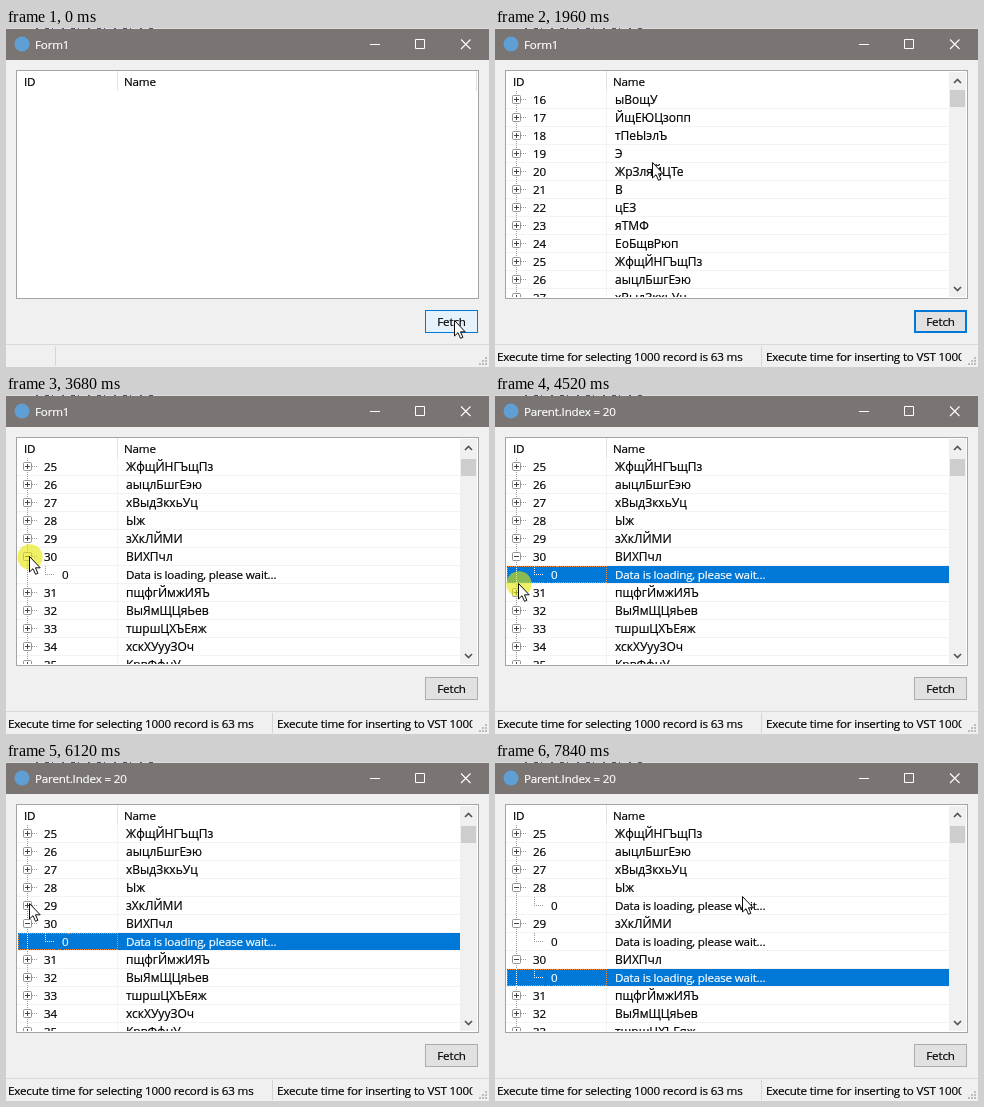
An HTML page for the animation above (8 s loop, 483 by 339 pixels).

```html
<!DOCTYPE html>
<html lang="en">
<head>
<meta charset="utf-8">
<title>Form1</title>
<style>
  html, body { margin: 0; width: 100%; height: 100%; overflow: hidden; background: #f0f0f0; }
  svg { display: block; width: 483px; height: 339px; }
  text {
    font: 11.6px "Open Sans", "Noto Sans", sans-serif; letter-spacing: -.165px; white-space: pre;
    color: #000; fill: currentColor; stroke: currentColor; stroke-width: .2px;
  }
  .name { font-size: 12px; letter-spacing: 0; }
  .crisp { shape-rendering: crispEdges; }
  .dots { stroke: #9a9a9a; stroke-dasharray: 1 1; fill: none; }
</style>
</head>
<body>
<svg viewBox="0 0 483 339">
  <defs>
    <clipPath id="listClip"><rect x="11" y="63" width="443" height="206"/></clipPath>
    <clipPath id="statusClip"><rect x="267" y="318" width="199.5" height="21"/></clipPath>
  </defs>

  <rect width="483" height="339" fill="#f0f0f0"/>
  <rect width="483" height="32" fill="#7a7473"/>
  <rect width="483" height="1" fill="#dedcdb"/>
  <path class="crisp" d="M30 .5H150" stroke="#4d5570" stroke-dasharray="2 7 4 3 1 9"/>
  <circle cx="16" cy="16" r="7.5" fill="#5f9fd4"/>
  <text id="title" x="29" y="21" style="color:#fff"></text>
  <g fill="none" stroke="#fff">
    <path d="M364 16.5H374M409.5 11.5H418.5V20.5H409.5Z"/>
    <path d="M455 11.5L464.5 21M464.5 11.5L455 21" stroke-width="1.1"/>
  </g>

  <rect x="10.5" y="42.5" width="462" height="228" fill="#fff" stroke="#a3a5a8"/>
  <path d="M111.5 43V63M470.5 43V63" stroke="#e3e3e3"/>
  <text x="18" y="58">ID</text>
  <text x="118" y="58">Name</text>
  <g id="rows" clip-path="url(#listClip)"></g>
  <g id="scrollbar">
    <rect x="454" y="44" width="17" height="225" fill="#f0f0f0"/>
    <rect id="thumb" x="455" width="15" height="17" fill="#cdcdcd"/>
    <path d="M459 55L462.5 51.5L466 55M459 259L462.5 262.5L466 259" fill="none" stroke="#555" stroke-width="1.7"/>
  </g>

  <rect id="button" class="crisp"/>
  <text x="445.5" y="298" text-anchor="middle">Fetch</text>

  <path d="M0 316.5H483" stroke="#d9d9d9"/>
  <path id="divider" stroke="#d5d5d5"/>
  <g id="status">
    <text x="2" y="333">Execute time for selecting 1000 record is 63 ms</text>
    <text x="271" y="333" clip-path="url(#statusClip)">Execute time for inserting to VST 1000 record is 16 ms</text>
  </g>
  <path fill="#bdbdbd" d="M479 329h2v2h-2zM476 332h2v2h-2zM479 332h2v2h-2zM473 335h2v2h-2zM476 335h2v2h-2zM479 335h2v2h-2z"/>

  <g id="pointer">
    <circle id="halo" cx="1" cy="1" r="12.7" fill="#e6e600" opacity=".6"/>
    <path d="M.5 .5V16L4 12.7L6.5 18.3L8.9 17.3L6.5 11.8H11.2Z" fill="#fff" stroke="#000" stroke-width=".95"/>
  </g>
</svg>
<script>
const LOOP = 8000, TICK = 40, FIRST_ID = 10, ROW = 18, LIST_TOP = 63;
const NAMES = `гЖыРтк ПцМящЮ Ущх лЗЙаеФВ КэжН рЩоЦъби ыВощУ ЙщЕЮЦзопп тПеЫэлЪ Э ЖрЗляЙЦТе В цЕЗ яТМФ
  ЕоБщвРюп ЖфщЙНГЪщПз аыцлБшгЕэю хВыдЗкхьУц Ыж зХкЛЙМИ ВИХПчл пщфгЙмжИЯЪ ВыЯмЩЦяЬев тшршЦХЪЕяж
  хскХУууЗОч КрвФфнУ эЛГайЦЖьВх`.split(/\s+/);

// Window state changes: each entry is merged over the ones before it.
const STATES = [
  [0, { title: 'Form1', button: 'hover', loaded: false, top: 0, open: [], selected: 0 }],
  [280, { button: 'pressed' }],
  [400, { button: 'hover', loaded: true }],
  [480, { button: 'focused' }],
  [1880, { top: 3 }],
  [1960, { top: 6 }],
  [2040, { top: 12 }],
  [2080, { top: 15 }],
  [3640, { button: 'normal', open: [30] }],
  [4440, { title: 'Parent.Index = 20', selected: 30 }],
  [6280, { open: [29, 30] }],
  [6760, { open: [28, 29, 30] }],
];

const POINTER = [
  [0, 448, 292], [400, 448, 292], [640, 220, 175], [1600, 220, 175], [1800, 157, 134],
  [2320, 157, 134], [2840, 2, 171], [2960, 2, 171], [3160, 14, 168], [3280, 14, 168],
  [3560, 23, 161], [3800, 23, 161], [4080, 27, 200], [4200, 27, 200], [4440, 23, 188],
  [4680, 23, 188], [4960, 50, 201], [5480, 130, 153], [5960, 25, 142], [6080, 25, 142],
  [6120, 23, 141], [6400, 23, 141], [6560, 24, 123], [6880, 24, 123], [7400, 312, 143],
  [7640, 312, 143], [7840, 247, 134],
];

const CLICKS = [[280, 400], [3640, 3800], [4440, 4680], [6280, 6440], [6760, 6920]];

const BUTTONS = { // fill, border, border width
  hover: ['#e5f1fb', '#0078d7', 1],
  pressed: ['#cce4f7', '#005499', 1],
  focused: ['#e1e1e1', '#0078d7', 2],
  normal: ['#e1e1e1', '#adadad', 1],
};

const $ = id => document.getElementById(id);
const set = (id, attrs) => Object.entries(attrs).forEach(([k, v]) => $(id).setAttribute(k, v));
const show = (id, on) => set(id, { visibility: on ? 'visible' : 'hidden' });
const label = (x, y, s, color = '#000', type = '') =>
  `<text class="${type}" x="${x}" y="${y}" style="color:${color}">${s}</text>`;
const dots = (d, color = '#9a9a9a') => `<path class="dots crisp" style="stroke:${color}" d="${d}"/>`;
const grid = y => `<path d="M11 ${y + 17.5}H454M111.5 ${y}V${y + ROW}" stroke="#f3f3f3"/>`;

function nodeRow(id, y, open) {
  const lineStart = id === FIRST_ID ? y + 9 : y;
  return grid(y) + dots(`M21.5 ${lineStart}V${y + ROW}M26 ${y + 8.5}H32`) +
    `<rect x="17.5" y="${y + 4.5}" width="8" height="8" rx="1" fill="#fff" stroke="#949494"/>
     <path class="crisp" d="M19 ${y + 8.5}h5${open ? '' : `M21.5 ${y + 6}v5`}" stroke="#444"/>` +
    label(38, y + 13, id) + label(120, y + 13, NAMES[id - FIRST_ID], '#000', 'name');
}

function childRow(y, selected) {
  const color = selected ? '#fff' : '#000';
  const line = selected ? '#fff' : '#9a9a9a';
  const highlight = selected
    ? `<rect x="12" y="${y}" width="442" height="17" fill="#0078d7"/>
       <rect class="dots crisp" x="12.5" y="${y + .5}" width="99" height="16" style="stroke:#ff8728"/>`
    : '';
  return grid(y) + highlight +
    dots(`M21.5 ${y}V${y + ROW}M39.5 ${y}V${y + 8}M39 ${y + 8.5}H49`, line) +
    label(56, y + 13, 0, color) + label(120, y + 13, 'Data is loading, please wait...', color);
}

function listRows({ loaded, top, open, selected }) {
  let html = '', y = LIST_TOP;
  for (let id = FIRST_ID + top; loaded && y < 269; id++) {
    const isOpen = open.includes(id);
    html += nodeRow(id, y, isOpen);
    y += ROW;
    if (isOpen) {
      html += childRow(y, selected === id);
      y += ROW;
    }
  }
  return html;
}

function drawWindow(state) {
  $('title').textContent = state.title;
  $('rows').innerHTML = listRows(state);
  show('scrollbar', state.loaded);
  show('status', state.loaded);
  set('thumb', { y: 61 + Math.round(state.top * .18) });
  set('divider', { d: `M${state.loaded ? 266.5 : 49.5} 318V338` });
  const [fill, stroke, w] = BUTTONS[state.button];
  set('button', {
    x: 419 + w / 2, y: 282 + w / 2, width: 53 - w, height: 23 - w, fill, stroke, 'stroke-width': w,
  });
}

function pointerAt(t) {
  const i = POINTER.findIndex(p => p[0] > t);
  if (i < 0) return POINTER.at(-1).slice(1);
  const [t0, x0, y0] = POINTER[i - 1], [t1, x1, y1] = POINTER[i];
  const k = (t - t0) / (t1 - t0);
  return [x0 + (x1 - x0) * k, y0 + (y1 - y0) * k].map(Math.round);
}

let shown = 0;
function render(now) {
  const t = Math.floor((now % LOOP) / TICK) * TICK;
  const past = STATES.filter(s => s[0] <= t);
  if (past.length !== shown) {
    shown = past.length;
    drawWindow(Object.assign({}, ...past.map(s => s[1])));
  }
  set('pointer', { transform: `translate(${pointerAt(t)})` });
  show('halo', CLICKS.some(([from, to]) => t >= from && t < to));
}

const start = performance.now();
function frame() {
  render(performance.now() - start);
  requestAnimationFrame(frame);
}
frame();
</script>
</body>
</html>
```
